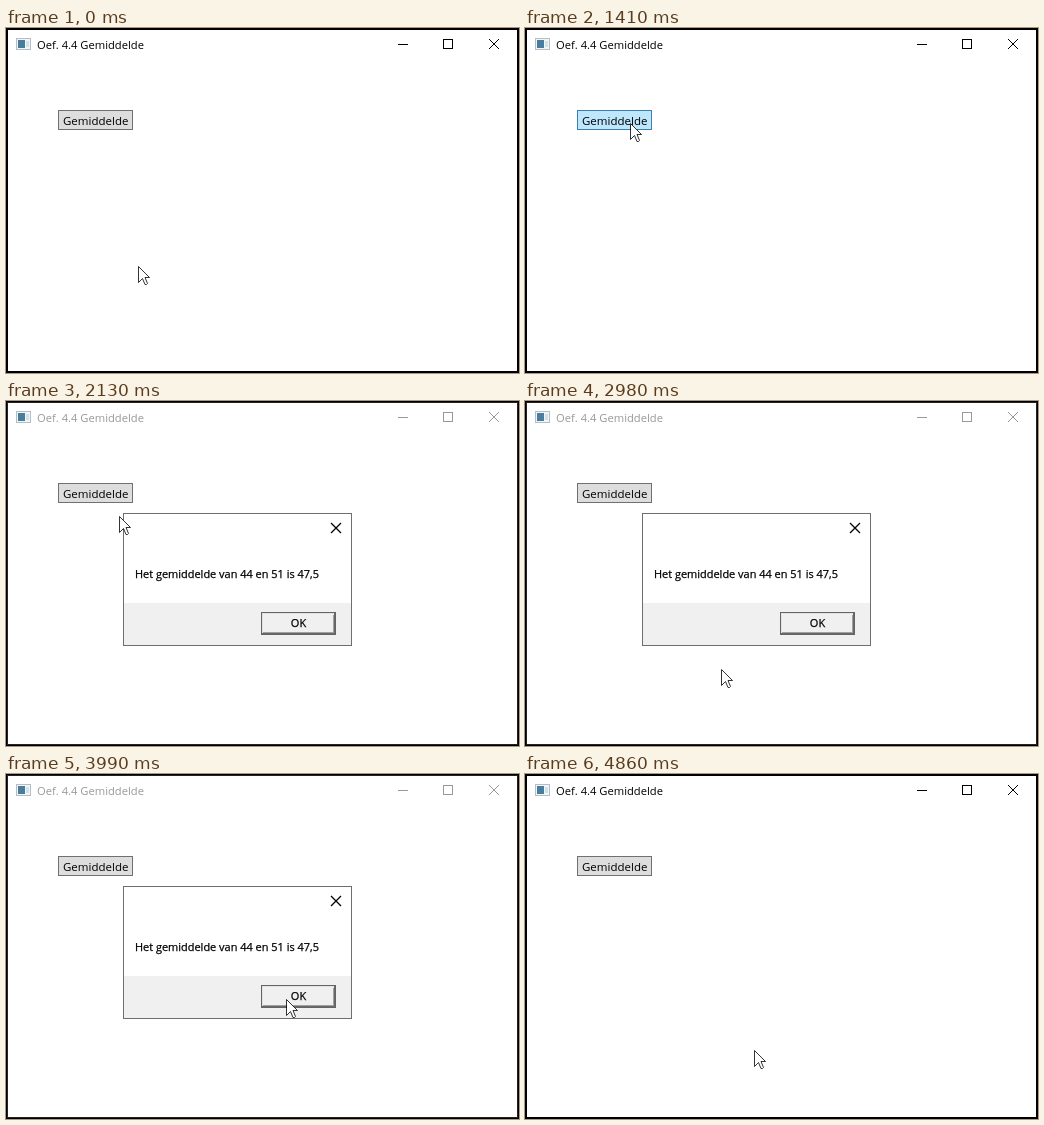
These frames come from a looping animation (513x345 px, 6.17 s). An HTML page:

```html
<!DOCTYPE html>
<html lang="nl">
<head>
<meta charset="utf-8">
<title>Gemiddelde</title>
<style>
  html, body { margin: 0; height: 100%; overflow: hidden; background: #fff; }
  svg { display: block; width: 513px; height: 345px; }
  text { font-family: "Open Sans", "Noto Sans", sans-serif; }
  .line { fill: none; stroke: currentColor; }
  .crisp { shape-rendering: crispEdges; }
  #dialog text { stroke: #000; stroke-width: .25px; }
</style>
</head>
<body>
<svg viewBox="0 0 513 345">
  <rect class="line crisp" x=".5" y=".5" width="512" height="344" color="#000"/>
  <rect class="line crisp" id="edge" x="1.5" y="1.5" width="510" height="342"/>

  <rect x="10.5" y="10.5" width="14" height="11" fill="#f1f5f7" stroke="#b4bec4"/>
  <rect x="12" y="12" width="7" height="8" fill="#4a7d9c"/>
  <rect x="20" y="13" width="3" height="6" fill="#cfe3ea"/>

  <g id="title">
    <text x="31" y="21" font-size="11.2" fill="currentColor">Oef. 4.4 Gemiddelde</text>
    <path class="line crisp" d="M392 16.5h10M437.5 11.5h9v9h-9z"/>
    <path class="line" d="M483 11l10 10M493 11l-10 10"/>
  </g>

  <rect class="crisp" id="button" x="52.5" y="82.5" width="74" height="19"/>
  <text x="57" y="97" font-size="11.5">Gemiddelde</text>

  <g id="dialog">
    <rect class="crisp" x="117.5" y="112.5" width="228" height="132" fill="#fff"/>
    <rect class="crisp" x="118" y="202" width="227" height="42" fill="#f0f0f0"/>
    <rect class="line crisp" x="117.5" y="112.5" width="228" height="132" color="#6e6e6e"/>
    <path class="line" d="M325 122l10 10M335 122l-10 10" color="#000" stroke-width="1.25"/>
    <text x="129" y="177" font-size="10.96">Het gemiddelde van 44 en 51 is 47,5</text>
    <rect class="line crisp" x="255.5" y="211.5" width="74" height="22" color="#646464"/>
    <g id="raised" class="crisp" fill="none">
      <path d="M256.5 232v-19.5h71" stroke="#e3e3e3"/>
      <path d="M257 231.5h70.5v-18" stroke="#a0a0a0"/>
      <path d="M256 232.5h72.5v-20.5" stroke="#696969"/>
    </g>
    <rect id="sunken" class="line crisp" x="256.5" y="212.5" width="72" height="20" color="#a0a0a0"/>
    <text id="ok" x="292.5" y="226" font-size="11" text-anchor="middle">OK</text>
  </g>

  <path id="cursor" class="crisp" fill="#fff" stroke="#000" stroke-width=".8" stroke-linejoin="round"
        d="M.5 .5v16l4-4 2.5 6h1.5l1-1-2.5-6h4.5z"/>
</svg>
<script>
const LOOP = 6170, STEP = 80;
const $ = id => document.getElementById(id);
const clamp = v => Math.min(1, Math.max(0, v));

const linear = p => p;
const slowDown = p => p * (2 - p);
const smooth = p => p * p * (3 - 2 * p);

// Pointer strokes: first and last refresh, then where the tip ends up.
const home = { x: 132, y: 238 };
const strokes = [
  { from: 690, to: 990, x: 111, y: 145, ease: linear },
  { from: 1090, to: 1250, x: 106, y: 102, ease: slowDown },
  { from: 1330, to: 1410, x: 105, y: 95, ease: linear },
  { from: 1970, to: 2130, x: 113, y: 115, ease: linear },
  { from: 2210, to: 2270, x: 125, y: 158, ease: linear },
  { from: 2350, to: 2980, x: 196, y: 268, ease: slowDown },
  { from: 3050, to: 3530, x: 273, y: 234, ease: smooth },
  { from: 3610, to: 3990, x: 280, y: 225, ease: slowDown },
  { from: 4390, to: 4860, x: 229, y: 276, ease: smooth },
];

// The pointer advances in even hops, the first one at the start of a stroke.
function pointer(t) {
  let { x, y } = home;
  for (const s of strokes) {
    if (t < s.from) break;
    const span = s.to - s.from;
    const hops = Math.round(span / STEP);
    const hop = Math.floor(clamp((t - s.from) / span) * hops) + 1;
    const p = s.ease(hop / (hops + 1));
    x += (s.x - x) * p;
    y += (s.y - y) * p;
  }
  return [Math.round(x), Math.round(y)];
}

// The message box appears and vanishes in two steps.
const halfSteps = (t, from) => clamp(Math.ceil((t - from + 1) / 90) / 2);

function draw(t) {
  const within = (from, to) => t >= from && t < to;

  const inactive = within(1800, 4390);
  $('title').style.color = inactive ? '#999' : '#000';
  $('edge').style.color = inactive ? '#222' : '#000';

  const [fill, stroke] = within(1730, 1800) ? ['#c4e5f6', '#2c628b']
    : within(1330, 1730) ? ['#bee6fd', '#3c7fb1'] : ['#ddd', '#707070'];
  $('button').setAttribute('fill', fill);
  $('button').setAttribute('stroke', stroke);

  const shown = halfSteps(t, 1870) - halfSteps(t, 4390);
  $('dialog').setAttribute('opacity', shown);
  $('dialog').setAttribute('transform',
    `translate(231.5 178.5) scale(${.94 + .06 * shown}) translate(-231.5 -178.5)`);

  const pressed = within(4230, 4390);
  $('raised').style.display = pressed ? 'none' : '';
  $('sunken').style.display = pressed ? '' : 'none';
  $('ok').setAttribute('transform', pressed ? 'translate(1 1)' : '');

  $('cursor').setAttribute('transform', `translate(${pointer(t)})`);
}

const start = performance.now();
function frame() {
  draw((performance.now() - start) % LOOP);
  requestAnimationFrame(frame);
}
frame();
</script>
</body>
</html>
```
